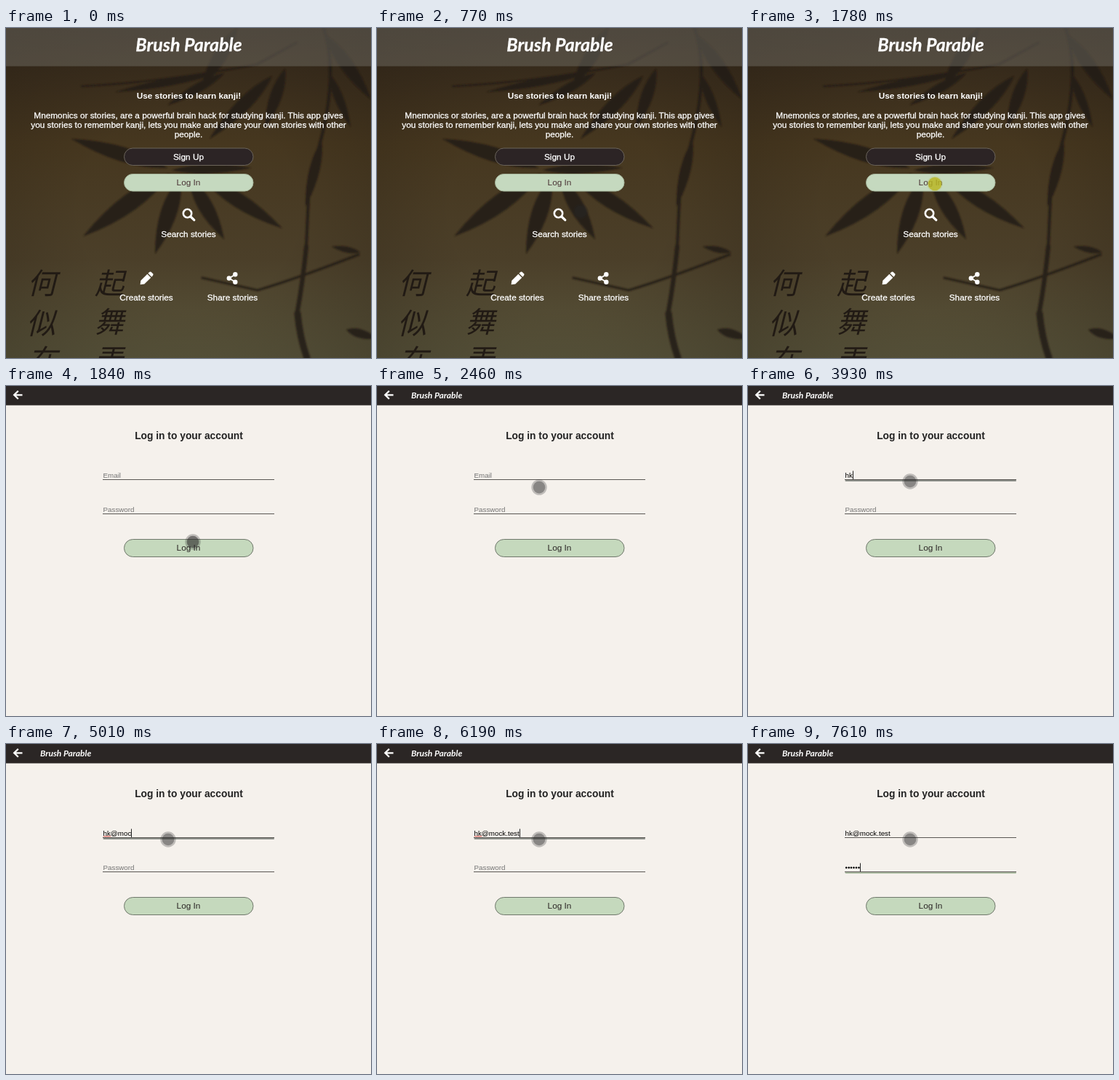
An HTML page that plays this animation: 502 px wide and 453 px high, repeating every 8000 ms.

```html
<!DOCTYPE html>
<html lang="en">
<head>
<meta charset="utf-8">
<title>Login walkthrough</title>
<style>
  html, body { margin: 0; width: 100%; height: 100%; overflow: hidden; }
  svg { display: block; width: 502px; height: 453px; }
  text { font: 11.8px "Liberation Sans", Arial, sans-serif; white-space: pre; }
  .mid { text-anchor: middle; }
  .light text { fill: #fff; stroke: #fff; stroke-width: .3px; }
  .light .heading { font-weight: 700; stroke: none; }
  .brand { font: italic 700 25px Lato, sans-serif; }
  .brand.compact { font-size: 12px; }
  .title { font-size: 13.8px; font-weight: 700; }
  .small { font-size: 9.8px; }
  .hint { fill: #757575; }
  .ink { fill: #211a14; stroke: #211a14; }
  .brush text { font: italic 300 40px "Noto Sans CJK SC", "Noto Sans CJK JP", sans-serif; fill: #211a14; }
</style>
</head>
<body>
<svg viewBox="0 0 502 453">
  <defs>
    <linearGradient id="paper" x2="0" y2="1">
      <stop offset="0" stop-color="#33281c"/>
      <stop offset=".35" stop-color="#46371f"/>
      <stop offset=".7" stop-color="#4b3f29"/>
      <stop offset="1" stop-color="#59553c"/>
    </linearGradient>
    <radialGradient id="shade" cx=".5" cy=".55" r=".75">
      <stop offset=".4" stop-color="#1c140c" stop-opacity="0"/>
      <stop offset="1" stop-color="#1c140c" stop-opacity=".3"/>
    </radialGradient>
    <filter id="soft"><feGaussianBlur stdDeviation="1"/></filter>
  </defs>

  <g id="welcome">
    <rect width="502" height="453" fill="url(#paper)"/>
    <rect width="502" height="453" fill="url(#shade)"/>
    <g class="ink" opacity=".85" filter="url(#soft)">
      <path id="leaves" stroke="none"/>
      <g fill="none" stroke-linecap="round">
        <path d="M437 0Q458 65 430 165L417 210L413 300" stroke-width="4"/>
        <path d="M413 300Q408 350 401 388" stroke-width="6"/>
        <path d="M401 392Q404 425 414 453" stroke-width="9"/>
        <path d="M270 343L346 360Q400 344 485 311" stroke-width="3"/>
        <path d="M104 80Q220 74 345 50L400 20" stroke-width="2"/>
      </g>
    </g>
    <g class="brush mid">
      <text x="49" y="365">何</text><text x="48" y="420">似</text><text x="50" y="470">在</text>
      <text x="142" y="365">起</text><text x="142" y="418">舞</text><text x="141" y="470">弄</text>
    </g>
    <rect width="502" height="52.5" fill="#77736b" fill-opacity=".45"/>

    <g class="light mid">
      <text class="brand" x="251.5" y="31.5">Brush Parable</text>
      <text class="heading" x="251.5" y="97">Use stories to learn kanji!</text>
      <text x="251" y="124">Mnemonics or stories, are a powerful brain hack for studying kanji. This app gives</text>
      <text x="251" y="137">you stories to remember kanji, lets you make and share your own stories with other</text>
      <text x="251" y="150">people.</text>
      <rect x="162.5" y="165" width="177.5" height="23.5" rx="11.75" fill="#2c2425" stroke="#6b645b"/>
      <text x="251" y="181">Sign Up</text>
      <text x="251" y="286.500">Search stories</text>
      <text x="193" y="373.5">Create stories</text>
      <text x="311.5" y="373.5">Share stories</text>
    </g>
    <rect x="162.5" y="200.5" width="177.5" height="23.5" rx="11.75" fill="#c5d9bf" stroke="#a5b59b"/>
    <text class="mid" x="251" y="216" fill="#4a3436">Log In</text>

    <g stroke="#fff" fill="none">
      <circle cx="249.5" cy="254.5" r="5.7" stroke-width="2.6"/>
      <path d="M254 259L258.8 263.6" stroke-width="3.2" stroke-linecap="round"/>
      <path d="M315 338.5L307 343.5L315 348.5" stroke-width="1.8"/>
    </g>
    <g fill="#fff">
      <circle cx="315.3" cy="338.3" r="3.2"/>
      <circle cx="306.8" cy="343.5" r="3.2"/>
      <circle cx="315.3" cy="348.8" r="3.2"/>
      <path d="M184.6 352.3L185.3 346.7L194.4 337.8L199.3 342.7L190.3 351.6Z"/>
      <path d="M195.4 336.8L197.3 335Q198.6 334 199.8 335L202 337.3Q203 338.5 202 339.7L200.3 341.7Z"/>
    </g>
  </g>

  <g id="login">
    <rect width="502" height="453" fill="#f5f1ec"/>
    <rect width="502" height="26.5" fill="#2b2625"/>
    <path d="M22.5 12.3H11.5M16.8 6.8L11.2 12.3L16.8 17.8" fill="none" stroke="#fff" stroke-width="2.3"/>
    <text id="brand" class="brand compact" x="47" y="17" fill="#fff">Brush Parable</text>
    <text class="mid title" x="251.5" y="73" fill="#222">Log in to your account</text>
    <g id="email"></g>
    <g id="password"></g>
    <rect x="162.5" y="210.5" width="177.5" height="24" rx="12" fill="#c5d9bd" stroke="#70786c"/>
    <text class="mid" x="251" y="226" fill="#2b2625">Log In</text>
  </g>

  <g id="pointer">
    <circle r="10.7"/>
    <circle r="8.3"/>
  </g>
</svg>

<script>
const LOOP = 8000;
const $ = id => document.getElementById(id);
const show = (el, on) => el.style.display = on ? "" : "none";
const between = (t, a, b) => t >= a && t < b;
const countUntil = (times, t) => times.filter(x => x <= t).length;

// Bamboo leaves: base, tip, half width
const leaf = ([x, y, tx, ty, w]) => {
  const len = Math.hypot(tx - x, ty - y);
  const nx = -(ty - y) / len * w * 2, ny = (tx - x) / len * w * 2;
  const mx = x + (tx - x) * .4, my = y + (ty - y) * .4;
  return `M${x} ${y}Q${mx + nx} ${my + ny} ${tx} ${ty}Q${mx - nx} ${my - ny} ${x} ${y}`;
};
$("leaves").setAttribute("d", [
  [222, 192, 90, 152, 10], [225, 200, 106, 286, 12], [240, 205, 205, 310, 11],
  [252, 205, 300, 290, 10], [270, 205, 380, 275, 10], [228, 195, 338, 192, 6],
  [290, 62, 150, 88, 5], [300, 62, 222, 106, 6],
  [318, 0, 268, 82, 9], [366, 66, 280, 152, 9], [384, 56, 356, 138, 8],
  [440, 10, 502, 98, 9], [444, 62, 474, 136, 6],
  [434, 155, 412, 245, 7], [487, 308, 448, 300, 4], [468, 414, 510, 426, 6]
].map(leaf).join(""));

function makeField(id, label, lineY, glow) {
  $(id).innerHTML = `
    <rect class="glow" x="133.5" y="${lineY + .5}" width="235.5" height="2" rx="1" fill="${glow}"/>
    <path d="M133 ${lineY}H369" stroke="#5a5754"/>
    <text class="small hint" x="133.5" y="${lineY - 3}">${label}</text>
    <text class="small value" x="133.5" y="${lineY - 3}"></text>
    <path class="squiggle" d="M134 ${lineY - 1}${"l1.25 -1.5l1.25 1.5".repeat(4)}" fill="none" stroke="#e2332d" stroke-width=".8"/>
    <path class="caret" d="M0 ${lineY - 12}V${lineY - .5}" stroke="#222"/>`;
  const part = name => $(id).querySelector("." + name);
  const hint = part("hint"), value = part("value"), caret = part("caret");
  return (text, focused, caretOn, misspelt) => {
    value.textContent = text;
    show(hint, !text);
    show(part("glow"), focused);
    show(part("squiggle"), misspelt);
    show(caret, caretOn);
    const width = text ? value.getComputedTextLength() : 0;
    caret.setAttribute("transform", `translate(${Math.round(133.5 + width) + .5})`);
  };
}
const drawEmail = makeField("email", "Email", 128.5, "#8d908a");
const drawPassword = makeField("password", "Password", 175.5, "#b0c0a6");

const EMAIL = "hk@mock.test";
const emailKeys = [3620, 3930, 4320, 4630, 4870, 5010, 5260, 5720, 5720, 5960, 6110, 6190];
const passwordKeys = [6800, 6885, 6970, 7440, 7525, 7610];

// Pointer stops: time, x, y
const stops = [
  [320, 383, 420], [770, 280, 252], [1070, 257, 218], [1150, 257, 214],
  [2070, 257, 214], [2456, 223, 139], [2610, 223, 131]
];
// The pointer moves in discrete steps
function pointerAt(t) {
  if (t < 1070) t = 320 + Math.floor((t - 320) / 75) * 75;
  else if (t < 1150) t = 1070;
  else if (between(t, 2070, 2610)) t = 2070 + Math.floor((t - 2070) / 77.1) * 77.1;
  const next = stops.findIndex(s => s[0] > t);
  if (next < 0) return stops.at(-1).slice(1);
  const [t0, x0, y0] = stops[next - 1], [t1, x1, y1] = stops[next];
  const p = (t - t0) / (t1 - t0);
  return [x0 + (x1 - x0) * p, y0 + (y1 - y0) * p];
}

const [halo, core] = $("pointer").children;
function drawPointer(t) {
  show($("pointer"), t >= 320);
  if (t < 320) return;
  const pressed = between(t, 1780, 1840) || between(t, 4170, 4320);
  const color = pressed ? "#b9b622" : "#282626";
  $("pointer").setAttribute("transform", `translate(${pointerAt(t)})`);
  halo.setAttribute("fill", color);
  core.setAttribute("fill", color);
  core.setAttribute("r", pressed ? 9.3 : 8.3);
  halo.setAttribute("fill-opacity", pressed ? .15 : .26);
  core.setAttribute("fill-opacity", pressed ? .8 : between(t, 1840, 2070) ? .5 : .36);
}

function render(t) {
  const loggingIn = t >= 1840;
  show($("welcome"), !loggingIn);
  show($("login"), loggingIn);
  if (loggingIn) {
    show($("brand"), t >= 2070);
    const onEmail = between(t, 2840, 6500), onPassword = t >= 6500;
    drawEmail(EMAIL.slice(0, countUntil(emailKeys, t)), onEmail,
      onEmail && !between(t, 3390, 3620), between(t, 4320, 6500));
    drawPassword("•".repeat(countUntil(passwordKeys, t)), onPassword, onPassword, false);
  }
  drawPointer(t);
}

const start = performance.now();
function tick() {
  render((performance.now() - start) % LOOP);
  requestAnimationFrame(tick);
}
tick();
</script>
</body>
</html>
```
